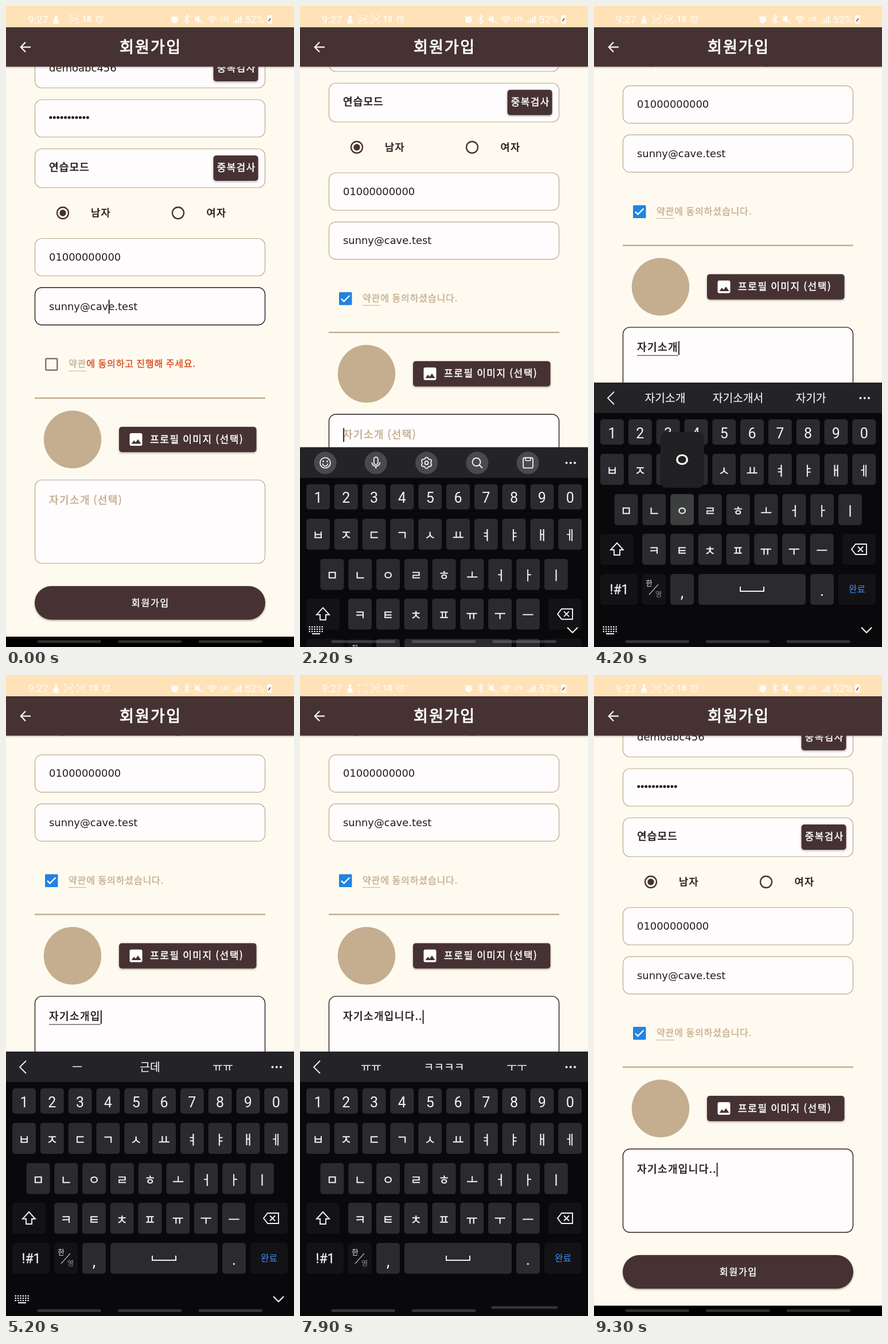
Recreate the animation shown at these times as an HTML page with a canvas. Size 502x1115 px, loop 9.4 s.

```html
<!DOCTYPE html>
<html lang="ko">
<head>
<meta charset="utf-8">
<title>회원가입</title>
<style>
html, body { margin: 0; width: 100%; height: 100%; overflow: hidden; background: #fffaef; }
canvas { display: block; }
</style>
</head>
<body>
<canvas id="stage" width="502" height="1115"></canvas>
<script>
const c = document.getElementById('stage').getContext('2d');
const W = 502, H = 1115, LOOP = 9400;
const BROWN = '#463233', TAN = '#c4ae8f', CREAM = '#fffaef', PAPER = '#fffcfe', INK = '#241b1a';
const KO = '"Noto Sans CJK KR", "Noto Sans CJK JP", "Noto Sans CJK", sans-serif';
const LATIN = '"DejaVu Sans", sans-serif';
const UI = 'Roboto, "Noto Sans", sans-serif';

// press time, key, text after release
const HOLD = 110;
const PRESSES = [
  [2950, 'ㅈ', 'ㅈ'], [3100, 'ㅏ', '자'], [3250, 'ㄱ', '작'], [3400, 'ㅣ', '자기'],
  [3550, 'ㅅ', '자깃'], [3700, 'ㅗ', '자기소'], [3850, 'ㄱ', '자기속'], [4000, 'ㅐ', '자기소개'],
  [4170, 'ㅇ', '자기소갱'], [4450, 'ㅣ', '자기소개이'], [4700, 'ㅂ', '자기소개입'],
  [5300, 'ㄴ', '자기소개입ㄴ'], [5600, 'ㅣ', '자기소개입니'], [5950, 'ㄷ', '자기소개입니ㄷ'],
  [6160, 'ㅏ', '자기소개입니다'], [6500, '.', '자기소개입니다.'], [6790, '.', '자기소개입니다..']
];
const CHECK = 1100, FOCUS = 1900, CLOSE = 8000;

const clamp = v => Math.max(0, Math.min(1, v));
const span = (t, a, b) => clamp((t - a) / (b - a));
const smooth = p => p * p * (3 - 2 * p);

function box(x, y, w, h, r, fill, stroke, lw = 1.2) {
  c.beginPath();
  c.roundRect(x, y, w, h, r);
  if (fill) { c.fillStyle = fill; c.fill(); }
  if (stroke) { c.strokeStyle = stroke; c.lineWidth = lw; c.stroke(); }
}
function dot(x, y, r, fill, stroke, lw = 2) {
  c.beginPath();
  c.arc(x, y, r, 0, Math.PI * 2);
  if (fill) { c.fillStyle = fill; c.fill(); }
  if (stroke) { c.strokeStyle = stroke; c.lineWidth = lw; c.stroke(); }
}
function line(pts, color, lw = 2, close) {
  c.beginPath();
  for (let i = 0; i < pts.length; i += 2) c.lineTo(pts[i], pts[i + 1]);
  if (close) c.closePath();
  c.strokeStyle = color; c.lineWidth = lw; c.stroke();
}
function poly(pts, color) {
  c.beginPath();
  for (let i = 0; i < pts.length; i += 2) c.lineTo(pts[i], pts[i + 1]);
  c.fillStyle = color; c.fill();
}
// y is the optical middle of the line, heavy thickens the strokes; returns the advance width
function text(s, x, y, size, color, { font = KO, gap = 0, align = 'left', weight = 400, heavy = 0 } = {}) {
  c.font = `${weight} ${size}px ${font}`;
  c.letterSpacing = gap + 'px';
  c.fillStyle = color;
  const w = c.measureText(s).width;
  const left = align === 'center' ? x - (w - gap) / 2 : x;
  const base = y + size * 0.365;
  c.fillText(s, left, base);
  if (heavy) {
    c.strokeStyle = color;
    c.lineWidth = heavy;
    c.lineJoin = 'round';
    c.strokeText(s, left, base);
    c.lineJoin = 'miter';
  }
  return w;
}
function shadow(on) {
  c.shadowColor = on ? 'rgba(60,35,30,.4)' : 'transparent';
  c.shadowBlur = on ? 3.5 : 0;
  c.shadowOffsetY = on ? 1.6 : 0;
}
function raised(x, y, w, h, r) {
  shadow(true);
  box(x, y, w, h, r, BROWN);
  shadow(false);
}
function caret(x, y) {
  c.fillStyle = BROWN;
  c.fillRect(x, y - 12, 2.2, 24);
}

function typed(t) {
  let s = '', at = FOCUS;
  for (const [time, , value] of PRESSES)
    if (t >= time + HOLD) { s = value; at = time + HOLD; }
  return { s, at };
}
const blink = (t, from) => Math.floor((t - from) / 500) % 2 === 0;

function scrollAt(t) {
  if (t < CLOSE) return 265.6 * smooth(span(t, 2036, 2400));
  return 265.6 * Math.exp(-(((t - CLOSE) / 188.3) ** 2));
}
function dropAt(t) {
  if (t < CLOSE) return 460 * (1 - span(t, 2000, 2398)) ** 2;
  return 460 * smooth(span(t, CLOSE, 8260));
}

function field(y, h, focused) {
  box(50.5, y, 401, h, 12, PAPER, focused ? INK : '#b9a88a', focused ? 1.4 : 1.2);
}
function dupButton(y) {
  raised(361.5, y, 78, 44, 5);
  text('중복검사', 401, y + 21, 16.8, '#fff', { gap: 1.6, align: 'center', heavy: .5 });
}

function drawForm(t) {
  const latin = { font: LATIN };
  const label = { gap: 1.4, heavy: .6 };
  c.save();
  c.beginPath();
  c.rect(0, 105, W, H);
  c.clip();
  c.translate(0, -scrollAt(t));

  field(75, 67.5);
  text('demoabc456', 75, 107, 18, INK, latin);
  dupButton(87);

  field(163, 65);
  for (let i = 0; i < 11; i++) dot(77.8 + i * 6.45, 194, 2.5, INK);

  field(248.5, 67.5);
  text('연습모드', 75, 280.5, 18, INK, { gap: 1.2, heavy: .7 });
  dupButton(260);

  dot(99, 360, 10, null, BROWN, 2.3);
  dot(99, 360, 5.7, BROWN);
  text('남자', 148, 359.5, 17.5, INK, label);
  dot(300, 360, 10, null, BROWN, 2.3);
  text('여자', 349.5, 359.5, 17.5, INK, label);

  field(404.5, 65);
  text('01000000000', 75, 436.5, 17.9, INK, latin);

  const onMail = t < FOCUS;
  field(489.8, 65, onMail);
  text('sunny@cave.test', 75, 522, 17.9, INK, latin);
  if (onMail && blink(t, 0)) caret(178.5, 523);

  drawTerms(t);

  c.fillStyle = TAN;
  c.fillRect(50, 680.8, 402, 2.5);
  dot(116, 754, 50.2, TAN);

  raised(197, 732, 239.5, 44, 5);
  box(215.5, 743, 22, 22, 3, '#fff');
  poly([218.5, 761.5, 223, 755.5, 226, 759, 230, 753.5, 235.5, 761.5], BROWN);
  text('프로필 이미지 (선택)', 251, 753.5, 17, '#fff', { gap: 1.6, heavy: .5 });

  field(824.5, 145, !onMail);
  const { s, at } = typed(t);
  const width = s ? text(s, 75, 859.5, 18, INK, label) : 0;
  if (!s) text('자기소개 (선택)', 75, 859.5, 18, TAN, label);
  if (s && at < 6500) line([75, 873.5, 75 + width, 873.5], INK, 1);
  if (!onMail && blink(t, at)) caret(75 + width, 860.5);

  raised(50, 1009, 402, 58.5, 29.2);
  text('회원가입', 251, 1038, 16, '#fff', { gap: 1.8, align: 'center', heavy: .4 });
  c.restore();
}

function drawTerms(t) {
  const p = span(t, CHECK, CHECK + 200);
  if (p === 0) box(69.3, 613.3, 20, 20, 1.5, null, '#6f6764', 2.2);
  else {
    box(68, 612, 22.5, 22.5, 1.5, '#2183e2');
    const a = clamp(p * 3), b = clamp((p - .33) * 1.5);
    const tick = [72, 623.5, 72 + 4.5 * a, 623.5 + 4.5 * a];
    if (b) tick.push(76.5 + 10 * b, 628 - 10 * b);
    line(tick, '#fff', 2.3);
  }
  const opt = { gap: .9, heavy: .4 };
  text('약관', 109, 622.5, 16, TAN, opt);
  line([109, 635, 140, 635], TAN, 1);
  if (p === 0) text('에 동의하고 진행해 주세요.', 140.3, 622.5, 16, '#db4b20', opt);
  else text('에 동의하셨습니다.', 140.3, 622.5, 16, TAN, opt);
}

function alarm(x, y) {
  dot(x, y + 1, 5.2, null, '#fff', 1.5);
  line([x, y - 2, x, y + 1.2, x + 2.3, y + 2.5], '#fff', 1.2);
  line([x - 6.5, y - 3.5, x - 3.5, y - 6], '#fff', 1.5);
  line([x + 6.5, y - 3.5, x + 3.5, y - 6], '#fff', 1.5);
}
function record(x, y, lens) {
  for (const sx of [-1, 1])
    for (const sy of [-1, 1])
      line([x + sx * 7, y + sy * 3, x + sx * 7, y + sy * 6.5, x + sx * 3.5, y + sy * 6.5], '#fff', 1.2);
  if (lens) {
    box(x - 4, y - 2.5, 6, 5, 1, null, '#fff', 1.1);
    line([x + 2, y, x + 5, y - 2, x + 5, y + 2], '#fff', 1.1);
  }
}

function drawTop(t) {
  shadow(true);
  c.fillStyle = BROWN;
  c.fillRect(0, 37, W, 68.5);
  shadow(false);
  line([43, 71.5, 26, 71.5], '#fff', 2.2);
  line([34, 63, 25.8, 71.5, 34, 80], '#fff', 2.2);
  text('회원가입', 251, 71.5, 27, '#fff', { gap: 2.2, align: 'center', heavy: 1 });

  c.fillStyle = '#ffe2b8';
  c.fillRect(0, 0, W, 37);
  c.globalAlpha = .88;
  const bar = { font: UI };
  text('9:27', 38, 23, 18.5, '#fff', bar);
  dot(87, 26, 4.6, '#fff');
  dot(87.5, 19, 2.6, '#fff');
  line([81.5, 30, 93, 30], '#fff', 1.4);
  const two = t >= CHECK;
  const first = t % 2000 < 1850;
  if (two) { record(109, 23, first); record(130.5, 23, true); }
  else record(119, 23, true);
  const shift = two ? 12 : 0;
  text('18', 132.5 + shift, 23, 14.5, '#fff', { font: UI, weight: 700 });
  alarm(163 + shift, 23);

  dot(294, 24, 5.5, '#fff');
  alarm(294, 23);
  line([311, 19, 319, 27, 315, 30.5, 315, 15.5, 319, 19, 311, 27], '#fff', 1.4);
  poly([329, 20.5, 332, 20.5, 337, 16, 337, 30, 332, 26, 329, 26], '#fff');
  line([328, 16, 343, 30], '#fff', 1.6);
  for (const r of [3.5, 7, 10.5]) {
    c.beginPath();
    c.arc(359, 29, r, -Math.PI * .78, -Math.PI * .22);
    c.strokeStyle = '#fff'; c.lineWidth = 1.8; c.stroke();
  }
  dot(359, 29, 1.4, '#fff');
  text('LTE', 374, 23, 9, '#fff', { font: UI, weight: 700 });
  for (let i = 0; i < 4; i++) {
    c.fillStyle = '#fff';
    c.fillRect(396 + i * 4, 27 - i * 3.2, 2.4, 3 + i * 3.2);
  }
  text('52%', 416, 23, 18.5, '#fff', bar);
  box(455, 16, 8.5, 15, 2.5, '#fff');
  c.globalAlpha = 1;
  line([461, 21.5, 457.5, 26.5], '#5a4a40', 1.5);
}

const PITCH = 48.8, KEY_W = 41;
const ROWS = [
  [11, 719, 44, '1234567890'],
  [11, 779, 54, 'ㅂㅈㄷㄱㅅㅛㅕㅑㅐㅔ'],
  [35.5, 849, 54, 'ㅁㄴㅇㄹㅎㅗㅓㅏㅣ'],
  [84, 918, 54, 'ㅋㅌㅊㅍㅠㅜㅡ']
];
const PLAIN = '#2b2b2f', DARK = '#131316', LIT = '#3c3f3d', GLYPH = '#f3f3f5';

function drawToolbar(t) {
  c.fillStyle = '#242427';
  c.fillRect(0, 655, W, 53);
  for (const x of [464.5, 471.8, 479]) dot(x, 682, 2, GLYPH);
  if (t < PRESSES[0][0] + HOLD) { drawTools(); return; }
  line([35, 671, 24, 682, 35, 693], GLYPH, 1.8);
  const words = t < 5000 ? ['자기소개', '자기소개서', '자기가']
    : t < 6900 ? ['ㅡ', '근데', 'ㅠㅠ'] : ['ㅠㅠ', 'ㅋㅋㅋㅋ', 'ㅜㅜ'];
  words.forEach((w, i) => text(w, 124 + i * 127, 682, 19.3, GLYPH, { align: 'center', heavy: .2 }));
}

function drawTools() {
  const y = 682;
  for (let i = 0; i < 5; i++) dot(44 + i * 88.3, y, 19.5, '#4a4a4d');
  dot(44, y, 9, null, GLYPH, 1.8);
  dot(40.5, y - 2.5, 1.4, GLYPH);
  dot(47.5, y - 2.5, 1.4, GLYPH);
  c.beginPath(); c.arc(44, y + 1, 4.5, 0, Math.PI); c.lineWidth = 1.8; c.stroke();

  box(128.8, y - 10, 7, 13, 3.5, null, GLYPH, 1.8);
  c.beginPath(); c.arc(132.3, y - 1, 7, 0, Math.PI); c.stroke();
  line([132.3, y + 6, 132.3, y + 10], GLYPH, 1.8);

  // six-lobed cog
  const gear = [];
  for (let i = 0; i < 72; i++) {
    const a = i * Math.PI / 36, r = 8.6 - Math.cos(a * 6);
    gear.push(220.6 + r * Math.cos(a), y + r * Math.sin(a));
  }
  line(gear, GLYPH, 1.8, true);
  dot(220.6, y, 3, null, GLYPH, 1.8);

  dot(307.5, y - 1.5, 7, null, GLYPH, 1.9);
  line([312.5, y + 3.5, 318, y + 9], GLYPH, 2);

  box(389, y - 9, 17, 18, 3, null, GLYPH, 1.8);
  box(393, y - 9, 9, 5, 1, null, GLYPH, 1.6);
}

function drawKeys(t) {
  const press = PRESSES.find(p => t >= p[0] && t < p[0] + HOLD);
  const down = press && press[1];
  let pop = null;
  ROWS.forEach(([x0, y, h, keys], row) => {
    [...keys].forEach((k, i) => {
      const x = x0 + i * PITCH, mid = x + KEY_W / 2;
      box(x, y, KEY_W, h, 5, k === down ? LIT : PLAIN);
      const opt = { align: 'center', font: row ? KO : UI, heavy: row ? .3 : 0 };
      text(k, mid, y + h / 2 + 1.5, row ? 22 : 25, GLYPH, opt);
      if (k === down) pop = [mid, y];
    });
  });

  box(11, 918, 58, 54, 5, DARK);
  line([40, 934, 51, 946, 45, 946, 45, 955, 35, 955, 35, 946, 29, 946], GLYPH, 1.9, true);
  box(433, 918, 58, 54, 5, DARK);
  line([456, 936, 475, 936, 475, 954, 456, 954, 449, 945], GLYPH, 1.9, true);
  line([460, 940.5, 469, 949.5], GLYPH, 1.9);
  line([469, 940.5, 460, 949.5], GLYPH, 1.9);

  const mid = { align: 'center' };
  const ui = { align: 'center', font: UI };
  box(11, 988, 65, 53.5, 5, DARK);
  text('!#1', 44, 1015, 23, GLYPH, { ...ui, heavy: .3 });
  box(84, 988, KEY_W, 53.5, 5, DARK);
  text('한', 96, 1004.5, 12.5, GLYPH, mid);
  text('영', 112.5, 1023, 12.5, '#8d8d90', mid);
  line([96, 1024, 112, 1006], GLYPH, 1.1);
  box(133, 988, KEY_W, 53.5, 5, PLAIN);
  text(',', 153.5, 1018.5, 28, GLYPH, ui);
  box(182, 988, 187, 53.5, 5, PLAIN);
  line([255, 1010, 255, 1018, 296, 1018, 296, 1010], GLYPH, 2);
  box(377, 988, KEY_W, 53.5, 5, down === '.' ? LIT : PLAIN);
  text('.', 397.5, 1016, 28, GLYPH, ui);
  box(426, 988, 65, 53.5, 5, DARK);
  text('완료', 458.5, 1014.5, 15.8, '#3d8df5', mid);

  if (pop) {
    box(pop[0] - 38, pop[1] - 108, 76, 97, 10, '#202023');
    text(down, pop[0], pop[1] - 59, 36, '#fff', { align: 'center', heavy: .4 });
  }
}

function drawBottom(t) {
  c.fillStyle = '#000';
  c.fillRect(0, 1097, W, 18);
  const drop = dropAt(t);
  if (drop < 459.5) {
    c.save();
    c.translate(0, drop);
    c.fillStyle = '#09080b';
    c.fillRect(0, 655, W, 460);
    drawToolbar(t);
    drawKeys(t);
    c.restore();
    if (t > 2050 && t < 7850) {
      c.fillStyle = GLYPH;
      for (let r = 0; r < 3; r++)
        for (let i = 0; i < 6; i++) c.fillRect(15.5 + i * 4.4, 1079 + r * 4, 2.4, 2.2);
      c.fillRect(21, 1091, 14, 2);
      line([466, 1081, 475, 1090, 484, 1081], GLYPH, 2.2);
    }
  }
  const lift = t >= 7750 && t < CLOSE;
  for (let i = 0; i < 3; i++) {
    const up = lift && i === 2;
    box(54.5 + i * 140.5 - (up ? 2 : 0), up ? 1098 : 1103.3, up ? 116 : 111.5, 4.6, 2.3, 'rgba(255,255,255,.18)');
  }
}

function draw(t) {
  c.fillStyle = CREAM;
  c.fillRect(0, 0, W, H);
  drawForm(t);
  drawTop(t);
  drawBottom(t);
}

const start = performance.now();
function tick() {
  draw((performance.now() - start) % LOOP);
  requestAnimationFrame(tick);
}
tick();
</script>
</body>
</html>
```
